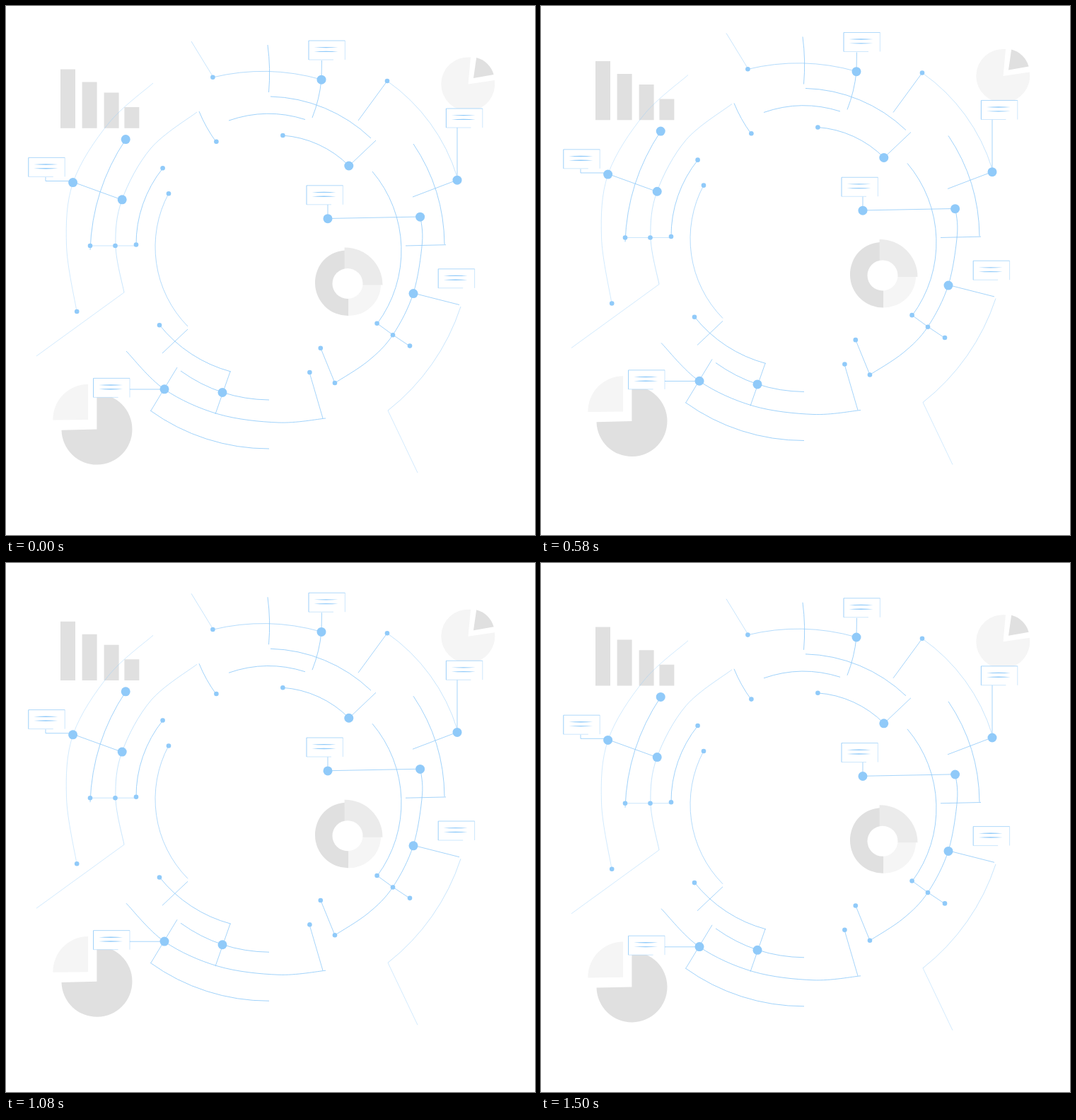
Write an HTML page that moves like this. It is 748 px wide and 748 px high and loops after 1540 ms.

```html
<!DOCTYPE html>
<html lang="en">
<head>
<meta charset="utf-8">
<title>Floating charts</title>
<style>
html, body { margin: 0; width: 100%; height: 100%; overflow: hidden; background: #fff; }
svg { display: block; width: 100%; height: 100%; }
.line { fill: none; stroke: #90caf9; stroke-width: .9; }
.dot, .lens { fill: #90caf9; }
.dark { fill: #e0e0e0; }
.mid { fill: #ebebeb; }
.light { fill: #f5f5f5; }
.white { fill: #fff; }
</style>
</head>
<body>
<svg viewBox="0 0 748 748">
  <g id="scene">
    <path class="dark" d="M77 89.6h21v83.1h-21zM107.6 107.6h21v65.1h-21zM138.6 122.5h21v50.2h-21zM167.4 143h21v29.7h-21z"/>
    <path class="light" d="M653.5 110.5L657 72.6A38 38 0 1 0 690.9 105Z"/>
    <path class="dark" d="M661 102L665.2 73A34 34 0 0 1 689.6 97Z"/>
    <path class="dark" d="M479 345.5C452 348 437 369 437 392A46.5 46.5 0 0 0 484.4 438V392H479Z"/>
    <path class="light" d="M484.4 394H530A45.6 44 0 0 1 484.4 438Z"/>
    <path class="mid" d="M478.6 341.5A53 53 0 0 1 532.5 394.5H478.6Z"/>
    <circle class="white" cx="483" cy="392.5" r="21.5"/>
    <path class="light" d="M116 585V534.7A50 50 0 0 0 66.4 585.6Z"/>
    <path class="dark" d="M128.4 598.6V548.6A50 50 0 1 1 78.5 599.8Z"/>
    <g id="lines"></g>
    <g id="labels"></g>
    <g id="dots"></g>
  </g>
</svg>
<script>
const $ = id => document.getElementById(id);
const TAU = Math.PI * 2;

function add(parent, tag, attrs) {
  const el = document.createElementNS('http://www.w3.org/2000/svg', tag);
  for (const k in attrs) el.setAttribute(k, attrs[k]);
  parent.appendChild(el);
}

// "x,y x,y ..." to point pairs
const parse = s => s.split(' ').map(p => p.split(',').map(Number));

// Circle arc through three points
function arc([[ax, ay], [bx, by], [cx, cy]]) {
  const cross = (bx - ax) * (cy - ay) - (by - ay) * (cx - ax);
  const r = Math.hypot(bx - ax, by - ay) * Math.hypot(cx - bx, cy - by) *
    Math.hypot(cx - ax, cy - ay) / (2 * Math.abs(cross));
  return `M${ax} ${ay}A${r} ${r} 0 0 ${cross > 0 ? 1 : 0} ${cx} ${cy}`;
}

// Smooth curve through any number of points
function spline(p) {
  let d = 'M' + p[0];
  for (let i = 0; i < p.length - 1; i++) {
    const a = p[i - 1] || p[i], b = p[i], c = p[i + 1], e = p[i + 2] || c;
    d += `C${b[0] + (c[0] - a[0]) / 6} ${b[1] + (c[1] - a[1]) / 6} ` +
      `${c[0] - (e[0] - b[0]) / 6} ${c[1] - (e[1] - b[1]) / 6} ${c}`;
  }
  return d;
}

function stroke(list, shape, opacity) {
  for (const s of list) {
    add($('lines'), 'path', { class: 'line', d: shape(parse(s)), opacity });
  }
}
const poly = p => 'M' + p.join('L');

stroke([
  '169,189 134,261 119,345',
  '222,229 194,279 184,338',
  '217,451 262,492 318,517',
  '204,572 283,612 372,626',
  '247,516 306,546 372,557',
  '518,234 559,345 525,449',
  '576,195 608.5,263 620,337',
  '391,183 442,196 485,226',
  '374,128 451,144.5 516,187',
  '315,162 368,152.5 423,160.5',
  '273,149 283,170 297,192',
  '370,55 372.5,85 371.5,122',
  '446,104 441.5,131 433,158'
], arc, .95);
stroke(['230,265 211,342 257,453', '292,101 365,92.5 446,104'], arc, .75);
stroke(['539,106 600,166 638,242', '643,425 602.5,506 540,572'], arc, .55);

stroke([
  '170,488 224,542 300,577 385,589 452,583',
  '465,533 512,502 547,465 576,406 588.5,335 586,298'
], spline, .95);
stroke(['270,150 205,201 164,274 155,339 167,405'], spline, .55);
stroke(['208,109 145,166 95,249 85.5,338 100,432'], spline, .45);

stroke([
  '257,457 221,491', '242,511 205,572', '317,517 296,577',
  '429,518 448,583', '445,484 465,533', '525,449 547,465 571,481',
  '576,406 641,422.5', '455,300.5 586,298', '455,281 455,300',
  '565,339 622,337.7', '575,270 638,246', '638,246 638,172',
  '539,106 498,162', '485,226 523,190', '446,104 446.5,77',
  '95,249 164,274', '56,242 56,247.5 95,247.5', '175,542 224,542'
], poly, .9);
stroke(['119,339 184,339', '262,50 292,99'], poly, .55);
stroke(['167,405 43,495', '540,572 582,660'], poly, .45);

// Small note cards
for (const [x, y] of parse('428,49 622.4,145 31.8,214.4 425,253.8 611.2,371.8 123.6,526.4')) {
  const g = $('labels');
  const edge = (d, opacity) => add(g, 'path', { class: 'line', d: `M${x} ${y}${d}`, opacity });
  add(g, 'rect', { class: 'white', x, y, width: 51.4, height: 27 });
  edge('v27', 1);
  edge('h51.4', .8);
  edge('m51.4 0v27', .5);
  edge('m0 27h35', .5);
  for (const dy of [9.6, 15.4]) {
    add(g, 'path', { class: 'lens', d: `M${x + 7.5} ${y + dy}q17 -1.4 34 0q-17 1.4 -34 0` });
  }
}

function dots(list, r) {
  for (const [cx, cy] of parse(list)) add($('dots'), 'circle', { class: 'dot', cx, cy, r });
}
dots('446,104.2 169.2,188.6 94.6,249.6 164.2,273.8 484.8,226 455,300.7 585.6,298.2 638,246.2 576,406.6 224,541.8 306,546.5', 6.5);
dots('292.4,100.8 539,106 297.4,191.8 391.4,183 221.6,229.2 230,265.2 119,339 154.5,339 184,337.5 100.2,432 ' +
  '217,451.3 429.4,518 444.8,483.7 465,533 524.6,448.7 547,465.3 571,480.6', 3.3);

// Height by time from the top of the float, the same on both sides
const LOOP = 1540, TOP = 722, STEP = 1000 / 24;
const KEYS = parse('0,-12.8 150,-11.35 350,-7 608,-1.9 722,0 800,1.1');

function slope(i) {
  if (!i) return 0;
  const a = KEYS[i - 1], b = KEYS[Math.min(i + 1, KEYS.length - 1)];
  return (b[1] - a[1]) / (b[0] - a[0]);
}

function height(d) {
  let i = 0;
  while (i < KEYS.length - 2 && d > KEYS[i + 1][0]) i++;
  const [x0, y0] = KEYS[i], [x1, y1] = KEYS[i + 1];
  const w = x1 - x0, u = (d - x0) / w, v = 1 - u;
  return v * v * (1 + 2 * u) * y0 + u * u * (3 - 2 * u) * y1 +
    u * v * w * (v * slope(i) - u * slope(i + 1));
}

function draw(ms) {
  const t = ms % LOOP;
  const held = Math.min(36, Math.floor((t + 4.5) / STEP)) * STEP;
  $('scene').setAttribute('transform', `translate(0 ${height(Math.abs(held - TOP)).toFixed(2)})`);
}

const start = performance.now();
function tick() {
  draw(performance.now() - start);
  requestAnimationFrame(tick);
}
tick();
</script>
</body>
</html>
```
